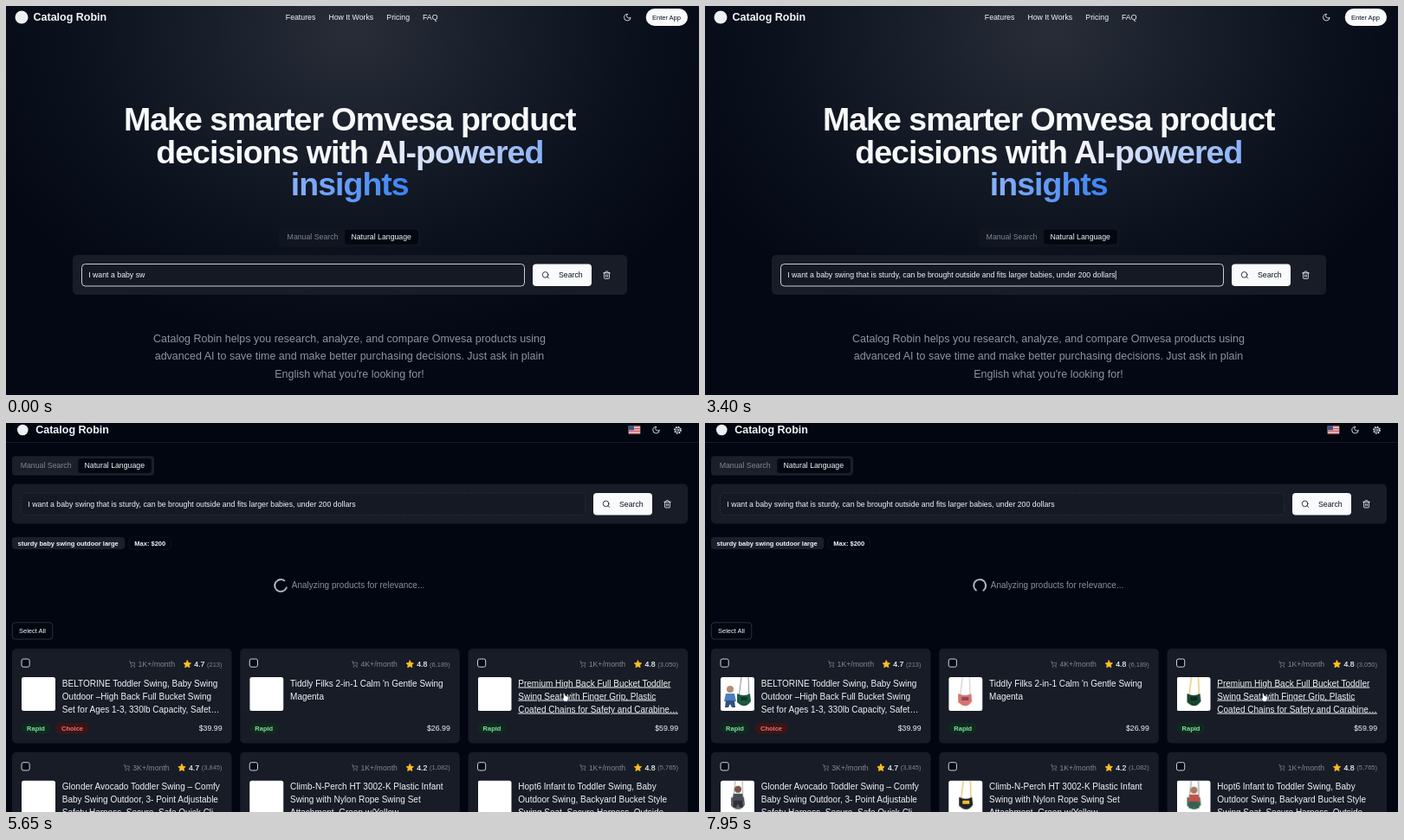
Recreate the animation shown at these times as an HTML page. Size 800 px wide and 450 px high, loop 8 s.

```html
<!DOCTYPE html>
<html lang="en">
<head>
<meta charset="utf-8">
<title>Product search</title>
<style>
  html, body { margin: 0; width: 100%; height: 100%; overflow: hidden; background: #020611; }
  body, svg text { font-family: "Liberation Sans", Arial, sans-serif; }
  .scene, svg { position: absolute; left: 0; top: 0; width: 800px; height: 450px; }
  svg text { white-space: pre; }
  .icon { fill: none; stroke-width: 2; stroke-linecap: round; stroke-linejoin: round; }
  #home {
    background: radial-gradient(ellipse 470px 370px at 400px 30px,
      #282d38 0, #1a202b 33%, #0b111d 68%, #030814 100%);
  }
  h1 {
    position: absolute; left: 0; top: 113.2px; width: 793.6px; margin: 0;
    font-size: 37.5px; line-height: 37.5px; letter-spacing: -.0262em;
    text-align: center; color: #f8fafc;
  }
  h1 span {
    color: transparent;
    background: linear-gradient(90deg, #f8f5fb, #3b82f6);
    -webkit-background-clip: text; background-clip: text;
  }
  #home, #app, .loading, .results, .photos, .arrow, .hand, .shift {
    animation: 8s step-end infinite;
  }
  #home { animation-name: home; }
  #app { animation-name: app; }
  .loading { animation-name: loading; }
  .results { animation-name: results; }
  .photos { animation-name: photos; }
  .arrow { animation-name: arrow; }
  .hand { animation-name: hand; }
  .shift { animation-name: shift; }
  @keyframes home { 0% { opacity: 1 } 47.5%, 100% { opacity: 0 } }
  @keyframes app { 0% { opacity: 0 } 52%, 100% { opacity: 1 } }
  @keyframes loading { 0% { opacity: 1 } 67.5%, 100% { opacity: 0 } }
  @keyframes results { 0% { opacity: 0 } 67.5%, 100% { opacity: 1 } }
  @keyframes photos { 0% { opacity: 0 } 78.1%, 100% { opacity: 1 } }
  @keyframes arrow { 0% { opacity: 0 } 47.5% { opacity: 1 } 67.5%, 100% { opacity: 0 } }
  @keyframes hand { 0% { opacity: 0 } 43.75% { opacity: 1 } 47.5% { opacity: 0 } 67.5%, 100% { opacity: 1 } }
  @keyframes shift { 0% { transform: translateX(4.6px) } 67.5%, 100% { transform: none } }
  .spin { transform-origin: 0 0; animation: spin 1s linear infinite; }
  @keyframes spin { to { transform: rotate(360deg) } }
</style>
</head>
<body>
<div class="scene" id="home">
  <svg viewBox="0 0 800 450" id="homeArt"></svg>
  <h1>Make smarter Omvesa product<br>decisions with <span>AI-powered<br>insights</span></h1>
</div>
<div class="scene" id="app"><svg viewBox="0 0 800 450" id="appArt"></svg></div>
<svg viewBox="0 0 800 450" id="pointer"></svg>
<script>
const INK = '#f1f5f9', MUTED = '#7f8897', DARK = '#0b1120', PANEL = '#171c26';
const BRAND = 'Catalog Robin';
const QUERY = 'I want a baby swing that is sturdy, can be brought outside and fits larger babies, under 200 dollars';

const text = (x, y, s, size = 8.75, fill = INK, extra = '') =>
  `<text x="${x}" y="${y}" font-size="${size}" fill="${fill}" ${extra}>${s}</text>`;
const box = (x, y, w, h, r, fill = 'none', stroke = 'none', extra = '') =>
  `<rect x="${x}" y="${y}" width="${w}" height="${h}" rx="${r}" fill="${fill}" stroke="${stroke}" ${extra}/>`;
const at = (x, y, s) => `<g transform="translate(${x} ${y})">${s}</g>`;
const BOLD = 'font-weight="700"', END = 'text-anchor="end"', MID = 'text-anchor="middle"';

const ICONS = {
  search: '<circle cx="11" cy="11" r="8"/><path d="m21 21-4.3-4.3"/>',
  trash: '<path d="M3 6h18M19 6v14a2 2 0 0 1-2 2H7a2 2 0 0 1-2-2V6M8 6V4a2 2 0 0 1 2-2h4a2 2 0 0 1 2 2v2M10 11v6M14 11v6"/>',
  moon: '<path d="M12 3a6 6 0 0 0 9 9 9 9 0 1 1-9-9Z"/>',
  gear: '<circle cx="12" cy="12" r="3"/><circle cx="12" cy="12" r="7.5"/><circle cx="12" cy="12" r="9.3" stroke-dasharray="3.2 4.1" stroke-linecap="butt" stroke-width="3"/>',
  cart: '<circle cx="8" cy="21" r="1"/><circle cx="19" cy="21" r="1"/><path d="M2 2h3l2.7 12.4a2 2 0 0 0 2 1.6h9.7l2-9H5.5"/>',
  star: '<path fill="#fbbf24" d="M12 2l3.1 6.3 6.9 1-5 4.9 1.2 6.8L12 17.8 5.8 21 7 14.2 2 9.3l6.9-1z"/>',
  left: '<path d="m15 18-6-6 6-6"/>',
  right: '<path d="m9 18 6-6-6-6"/>'
};
const icon = (name, cx, cy, color = INK, size = 10) =>
  `<g class="icon" stroke="${color}" transform="translate(${cx} ${cy}) scale(${size / 24}) translate(-12 -12)">${ICONS[name]}</g>`;

const spinner = (x, y, delay) => at(x, y,
  `<path class="spin" style="animation-delay:${delay}s" d="M7 0A7 7 0 1 1 2.16 -6.66" fill="none" stroke="#dfe5ee" stroke-width="1.6" stroke-linecap="round"/>`);

const tabs = (x, y, fill) => at(x, y,
  box(0, 0, 164, 22.5, 4, fill) + box(76.3, 2.7, 84.6, 17, 3, '#030711') +
  text(9.7, 14.3, 'Manual Search', 8.75, MUTED) + text(83.5, 14.3, 'Natural Language'));

const searchBar = (x, y, w, border, inputExtra, content) => at(x, y,
  box(0, 0, w, 46, 5, PANEL) +
  box(10.5, 10.5, w - 129, 25.5, 4, '#141924', border, inputExtra) + content +
  box(w - 109, 10.5, 68, 25.5, 4, '#f8fafc') +
  icon('search', w - 94, 23.3, DARK) + text(w - 79, 26.4, 'Search', 8.75, DARK) +
  icon('trash', w - 23.5, 23.3));

homeArt.innerHTML =
  '<circle cx="18" cy="13" r="7.5" fill="#eef0f2"/>' + text(31.5, 17.4, BRAND, 12.5, INK, BOLD) +
  [[322.8, 'Features'], [372.4, 'How It Works'], [439.3, 'Pricing'], [481, 'FAQ']]
    .map(([x, s]) => text(x, 16.3, s)).join('') +
  icon('moon', 717.3, 13.2) +
  box(738.7, 3, 48.3, 20, 10, '#f8fafc') + text(746, 15.8, 'Enter App', 7.5, DARK) +
  tabs(314.9, 256, '#10151f') +
  searchBar(77, 288, 640, '#c8ced8', '',
    text(18.2, 26.4, '', 8.75, INK, 'id="typed"') + box(0, 18.3, .8, 10, 0, INK, 'none', 'id="caret"')) +
  [`${BRAND} helps you research, analyze, and compare Omvesa products using`,
   'advanced AI to save time and make better purchasing decisions. Just ask in plain',
   "English what you're looking for!"]
    .map((s, i) => text(396.5, 388.7 + i * 20.4, s, 12.5, '#8b94a2', MID)).join('');

const flag = at(718.7, 3.2,
  box(0, 0, 13.5, 9.6, .8, '#e9e6e8') +
  [0, 1, 2, 3].map(i => box(0, i * 2.74, 13.5, 1.37, 0, '#c2474f')).join('') +
  box(0, 0, 6.2, 5, 0, '#3b4f86'));

// Thumbnails, drawn on a 39 px white tile
const seat = (x, color, rope, accent = color) =>
  `<path d="M${x - 3} 0L${x - 6} 24M${x + 5} 0L${x + 6} 24" stroke="${rope}" fill="none"/>` +
  `<path d="M${x - 8} 19q8 4 15 0l1 9q-7 10-16 1z" fill="${color}"/>` +
  `<path d="M${x - 4} 23h8v4h-8z" fill="${accent}"/>`;
const child = (x, y, skin, top, legs) =>
  `<circle cx="${x}" cy="${y}" r="4" fill="${skin}"/>` +
  `<path d="M${x - 5} ${y + 5}h10l2 9h-14z" fill="${top}"/>` +
  `<path d="M${x - 5} ${y + 13}h10l1 8h-4l-2-4-2 4h-4z" fill="${legs}"/>`;
const photos = [
  child(11, 14, '#b98b70', '#4a80bd', '#33507d') + seat(27, '#1e5a42', '#8a9490', '#123a2b'),
  seat(19, '#d8746c', '#c3c5ca', '#8a4a66'),
  seat(20, '#17462f', '#d8b53a', '#0e2a1d'),
  seat(20, '#64666d', '#a9a9a9') + child(20, 10, '#7a5546', '#4a4d58', '#2e3038'),
  seat(20, '#202226', '#d9b23c', '#edc12f'),
  seat(20, '#2f7350', '#87938d') + child(20, 11, '#a9775c', '#c0524c', '#3c5f52')
];

const products = [
  ['1K+', '4.7', '213', '$39.99', ['BELTORINE Toddler Swing, Baby Swing', 'Outdoor –High Back Full Bucket Swing', 'Set for Ages 1-3, 330lb Capacity, Safet…']],
  ['4K+', '4.8', '6,189', '$26.99', ["Tiddly Filks 2-in-1 Calm 'n Gentle Swing", 'Magenta']],
  ['1K+', '4.8', '3,050', '$59.99', ['Premium High Back Full Bucket Toddler', 'Swing Seat with Finger Grip, Plastic', 'Coated Chains for Safety and Carabine…']],
  ['3K+', '4.7', '3,845', '', ['Glonder Avocado Toddler Swing – Comfy', 'Baby Swing Outdoor, 3- Point Adjustable', 'Safety Harness, Secure, Safe Quick Cli…']],
  ['1K+', '4.2', '1,082', '', ['Climb-N-Perch HT 3002-K Plastic Infant', 'Swing with Nylon Rope Swing Set', 'Attachment, Green w/Yellow']],
  ['1K+', '4.8', '5,765', '', ['Hopt6 Infant to Toddler Swing, Baby', 'Outdoor Swing, Backyard Bucket Style', 'Swing Seat, Secure Harness, Outside…']]
];

const badge = (x, w, s, bg, fill) =>
  box(x, 85.8, w, 12.6, 6.3, bg) + text(x + w / 2, 94.8, s, 7.5, fill, `${BOLD} ${MID}`);

function card([sales, rating, count, price, lines], i) {
  const right = 242.5;
  const ratingX = right - (count.length > 3 ? 23.8 : 17.5) - 14.7;
  const salesEnd = ratingX - 22.3;
  return at(7 + (i % 3) * 263.25, 261 + (i > 2) * 119.7,
    box(0, 0, 253.5, 109.5, 5, PANEL) +
    box(11, 12, 9.2, 9.2, 2, '#060a14', '#cbd5e1') +
    icon('cart', salesEnd - 49.3, 18, MUTED, 8) +
    text(salesEnd, 21, sales + '/month', 8.75, MUTED, END) +
    icon('star', ratingX - 8, 18, '#fbbf24', 10) +
    text(ratingX, 21, rating, 8.75, INK, 'stroke="#f1f5f9" stroke-width=".2"') +
    text(right, 20.6, `(${count})`, 7.5, MUTED, END) +
    box(11, 33, 39, 39, 2.5, '#fff') +
    `<g class="photos">${at(11, 33, photos[i])}</g>` +
    lines.map((s, n) => text(57.8, 43.5 + n * 15, s, 10, INK, i === 2 ? 'text-decoration="underline"' : '')).join('') +
    badge(11, 33, 'Rapid', '#10291f', '#7fe3a3') +
    (i ? '' : badge(50, 39, 'Choice', '#3a1517', '#ee7466')) +
    text(right, 95, price, 8.75, INK, END));
}

const selectAll = y => box(7.3, y, 46.5, 19.3, 3.5, '#030711', '#343b48', 'stroke-width=".8"') +
  text(15, y + 12.3, 'Select All', 7.5);

appArt.innerHTML = '<g class="shift">' +
  '<circle cx="19.3" cy="8" r="6.3" fill="#eef0f2"/>' + text(34.2, 12.4, BRAND, 12.5, INK, BOLD) +
  flag + icon('moon', 750.5, 8.2) + icon('gear', 775.5, 8.2) +
  box(-10, 22, 820, .8, 0, '#1a202c') +
  tabs(7, 38.2, '#1a1f2a') +
  searchBar(7, 70.5, 780, '#303746', 'stroke-width=".7" stroke-dasharray="2 1.5"', text(18.3, 26.4, QUERY)) +
  '<g class="loading">' +
    box(7, 132, 13.5, 4, 2, '#1a202b') + selectAll(151) + spinner(396.6, 211, -.897) +
    box(7, 250.3, 785, 1, 0, '#1b212c') + text(696, 267, 'Page 1', 8.75, MUTED) +
    icon('left', 744, 264, MUTED) + icon('right', 774, 264) +
  '</g><g class="results">' +
    box(7, 132, 130.3, 14, 4, '#1a202b') +
    text(13.5, 141.6, 'sturdy baby swing outdoor large', 7.5, INK, BOLD) +
    box(142, 132, 48.5, 14, 4, 'none', '#121824', 'stroke-width=".7"') + text(148.3, 141.6, 'Max: $200', 7.5, INK, BOLD) +
    spinner(317.2, 188, -.4) + text(329.8, 191.3, 'Analyzing products for relevance...', 10, '#868f9d') +
    selectAll(230.8) + products.map(card).join('') +
  '</g></g>';

pointer.innerHTML =
  '<path class="arrow" d="M643 312v9.3l2.1-1.9 1.5 3.3 1.5-.7-1.4-3.2h2.7z" fill="#0a0a0a" stroke="#fff" stroke-width=".8"/>' +
  '<path class="hand" d="M643.2 312.6q1-.8 1.6.2l1 2.6 2.6.7q1.2.4 1 1.7l-.6 3.2-1 1.2h-3.4l-2.6-3.4q.1-1 1.7-.4z" fill="#fff" stroke="#111" stroke-width=".6"/>';

// Typing pace: time in ms, characters shown
const PACE = [[0, 16], [900, 35], [1650, 51], [1750, 51], [2100, 60], [3250, 100]];
function charsAt(t) {
  const k = PACE.findIndex(p => p[0] > t);
  if (k < 0) return QUERY.length;
  const [t0, n0] = PACE[k - 1], [t1, n1] = PACE[k];
  return Math.floor(n0 + (n1 - n0) * (t - t0) / (t1 - t0) + 1e-6);
}

const typed = document.getElementById('typed'), caret = document.getElementById('caret');
let start;
function draw(now) {
  start ??= now;
  const t = (now - start) % 8000;
  const shown = QUERY.slice(0, charsAt(t));
  if (typed.textContent !== shown) {
    typed.textContent = shown;
    caret.setAttribute('x', 18.5 + typed.getComputedTextLength());
  }
  caret.setAttribute('opacity', t < 100 ? 0 : 1);
  requestAnimationFrame(draw);
}
requestAnimationFrame(draw);
</script>
</body>
</html>
```
